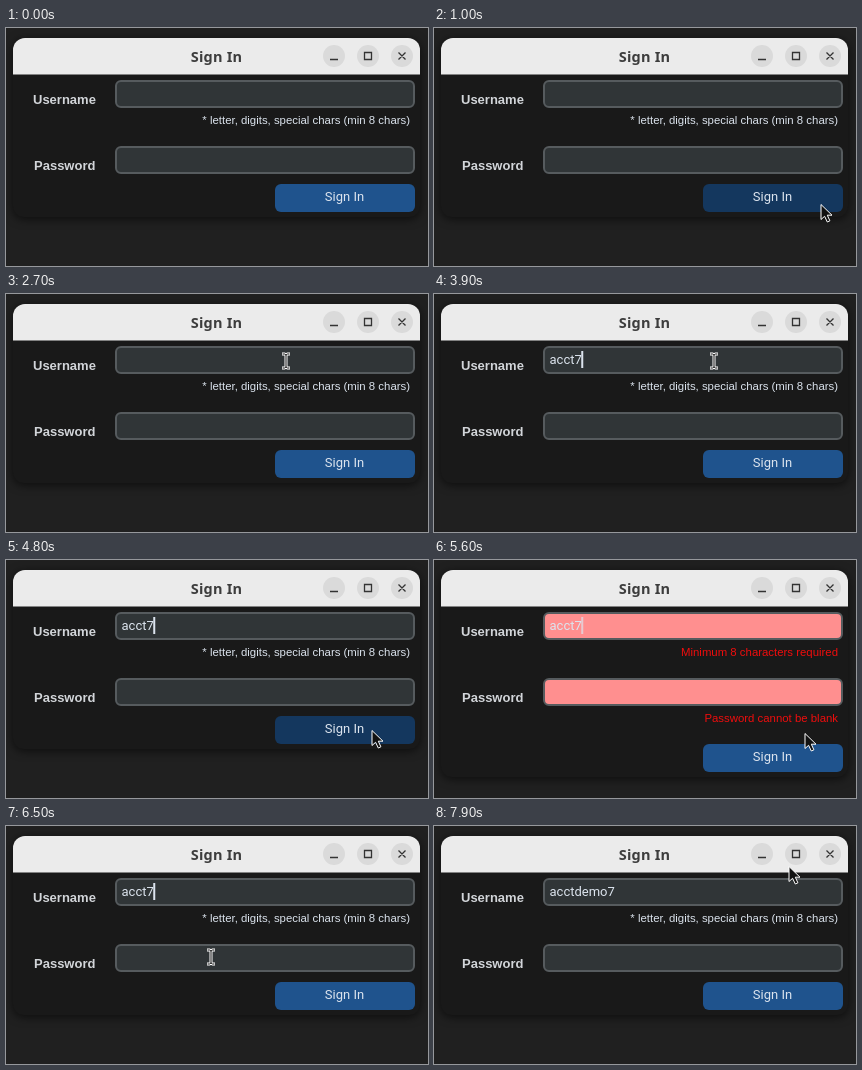
These frames come from a looping animation (422 by 238 pixels, 8000 ms). An HTML page:

```html
<!DOCTYPE html>
<html lang="en">
<head>
<meta charset="utf-8">
<title>Sign In</title>
<style>
  html, body { margin: 0; width: 100%; height: 100%; overflow: hidden; background: #202020; }
  svg { display: block; width: 100vw; height: 100vh; }
  text { font-family: "Liberation Sans", Arial, sans-serif; fill: #dce4ee; }
  .title { font: 700 14.5px "Noto Sans", "Open Sans", sans-serif; letter-spacing: .2px; fill: #3d3d3d; text-anchor: middle; }
  .label { font-size: 13px; font-weight: 700; fill: #d2d5d9; }
  .note { font-size: 11.4px; text-anchor: end; }
  .bad { fill: #f00d0d; }
  .ui { font: 13px Roboto, sans-serif; }
  .field { fill: #303537; stroke: #565b5e; stroke-width: 2; }
  .invalid { fill: #ff8f8f; }
  #window { filter: drop-shadow(0 2px 5px rgba(0, 0, 0, .6)); }
</style>
</head>
<body>
<svg viewBox="0 0 422 238">
  <g id="window">
    <rect id="body" x="7" y="10" width="407" height="179" rx="11" fill="#191919"/>
    <path d="M7 46.5V22a12 12 0 0 1 12-12H402a12 12 0 0 1 12 12V46.5Z" fill="#ebebeb"/>
  </g>
  <text class="title" x="210.5" y="34">Sign In</text>
  <g fill="#dadada">
    <circle cx="328" cy="28" r="11"/>
    <circle cx="362" cy="28" r="11"/>
    <circle cx="396" cy="28" r="11"/>
  </g>
  <path d="M324 31.5h8M358.5 24.5h7v7h-7ZM392.5 24.5l7 7m0-7l-7 7" fill="none" stroke="#333" stroke-width="1.3"/>

  <text class="label" x="27" y="76">Username</text>
  <text class="label" x="28" y="142">Password</text>
  <rect class="field" x="110" y="53" width="298" height="26" rx="5"/>
  <rect class="field" x="110" y="119" width="298" height="26" rx="5"/>
  <text class="note" id="userNote" x="404" y="96"></text>
  <text class="note bad" id="passNote" x="404" y="162">Password cannot be blank</text>
  <text class="ui" id="typed" x="115.5" y="70"></text>
  <rect id="caret" y="57" width="2" height="17" fill="#dce4ee"/>

  <g id="button">
    <rect id="face" x="269" y="156" width="140" height="28" rx="6"/>
    <text class="ui" x="338.5" y="173" text-anchor="middle">Sign In</text>
  </g>

  <path id="arrow" d="M0 .5V15.5L3.6 12.3L6.3 18L8.9 16.8L6.3 11.2H11Z" fill="#111" stroke="#fff" stroke-linejoin="round"/>
  <g id="beam" fill="none">
    <path d="M-4-7h2.500L0-6L1.500-7H4M0-6V6M-4 7h2.500L0 6L1.500 7H4" stroke="#fff" stroke-width="3"/>
    <path d="M-3.500-7h2L0-6L1.500-7H3.500M0-6V6M-3.500 7h2L0 6L1.500 7H3.500" stroke="#111"/>
  </g>
</svg>
<script>
const LOOP = 8000, STEP = 100;
const FINAL_NAME = "acctdemo7", SHORT_NAME = "acct7";

// Pointer stops: time, x, y
const stops = [
  [100, 402, 20], [900, 387, 176], [1900, 387, 176], [2400, 280, 67],
  [4000, 280, 67], [4600, 366, 170], [5000, 366, 170], [5500, 371, 173],
  [5600, 371, 173], [5900, 205, 131], [6500, 205, 131], [7200, 355, 40], [LOOP, 355, 40]
];

const $ = id => document.getElementById(id);
const fields = document.querySelectorAll(".field");
const within = (t, from, to) => t >= from && t < to;
const show = (id, visible) => $(id).setAttribute("visibility", visible ? "visible" : "hidden");
const ease = p => p * p * (3 - 2 * p);

function pointerAt(t) {
  const i = Math.max(1, stops.findIndex(s => s[0] > t));
  const [t0, x0, y0] = stops[i - 1], [t1, x1, y1] = stops[i];
  const p = ease(Math.max(0, (t - t0) / (t1 - t0)));
  return [x0 + (x1 - x0) * p, y0 + (y1 - y0) * p];
}

function textAt(t) {
  if (t < 3600) return "";
  if (t < 6900) return SHORT_NAME.slice(0, 1 + Math.ceil((t - 3600) / 75));
  if (t < 7400) return SHORT_NAME.slice(0, Math.max(2, 4 - (t - 6900) / 100));
  return FINAL_NAME.slice(0, 3 + Math.ceil((t - 7400) / 83));
}

function render(t) {
  const blank = within(t, 1100, 2700), short = within(t, 4900, 6500);
  const error = blank || short, shift = error ? 28 : 0;

  fields.forEach(f => f.classList.toggle("invalid", error));
  $("userNote").classList.toggle("bad", error);
  $("userNote").textContent = blank ? "Username cannot be blank"
    : short ? "Minimum 8 characters required"
    : "* letter, digits, special chars (min 8 chars)";
  show("passNote", error);
  $("body").setAttribute("height", 179 + shift);
  $("button").setAttribute("transform", `translate(0 ${shift})`);

  $("typed").textContent = textAt(t);
  $("caret").setAttribute("x", 115.5 + $("typed").getComputedTextLength() - .5);
  $("caret").setAttribute("opacity", error ? .7 : 1);
  show("caret", within(t, 2900, 7900) && !within(t, 6100, 6300));

  const [x, y] = pointerAt(t);
  const inside = (left, top) => x > left && x < 409 && y > top && y < top + 28;
  const overField = inside(109, 52) || inside(109, 118);
  $("face").setAttribute("fill", inside(269, 156 + shift) ? "#14375e" : "#1f538d");
  for (const id of ["arrow", "beam"]) {
    $(id).setAttribute("transform", `translate(${Math.round(x)} ${Math.round(y)})`);
    show(id, t >= 100 && overField === (id === "beam"));
  }
}

const start = performance.now();
function tick() {
  const t = (performance.now() - start) % LOOP;
  render(Math.floor(t / STEP) * STEP);
  requestAnimationFrame(tick);
}
tick();
</script>
</body>
</html>
```
